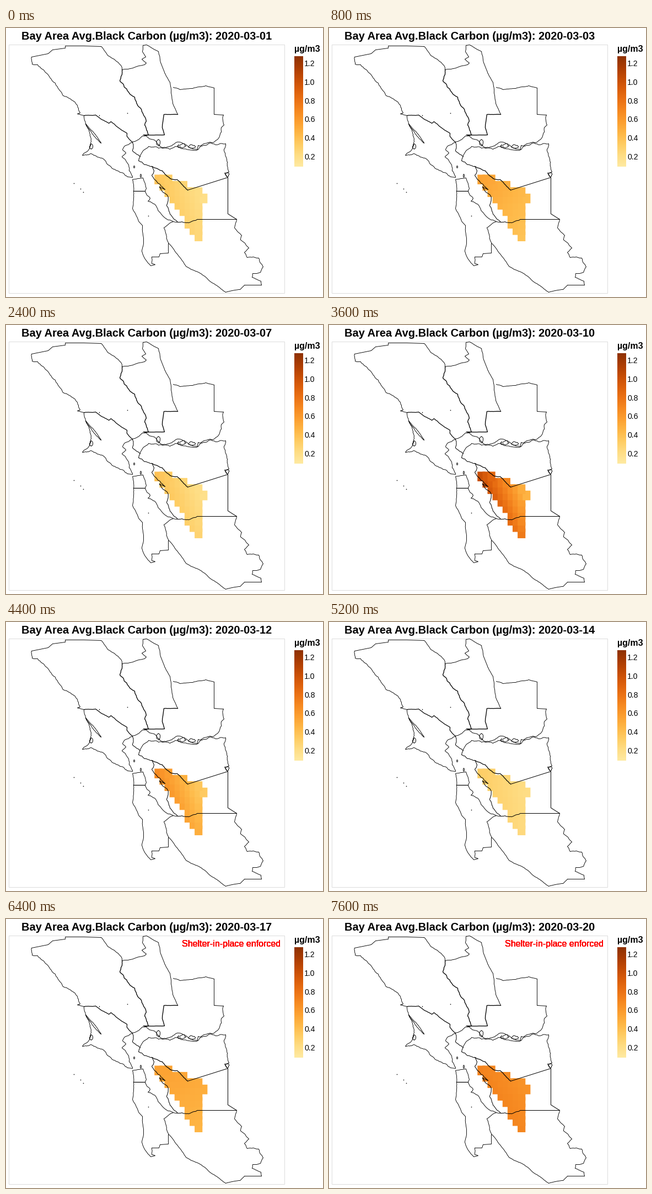
These frames come from a looping animation (575 by 487 pixels, 8 s). A matplotlib script:

```python
import numpy as np
import matplotlib.pyplot as plt
from matplotlib.animation import FuncAnimation
from matplotlib.colors import LinearSegmentedColormap, Normalize
from matplotlib.patches import Rectangle

W, H, DPI = 575, 487, 100
DAYS, STEP_MS = 20, 400
PX = 72 / DPI
plt.rcParams["font.family"] = "Liberation Sans"

fig = plt.figure(figsize=(W / DPI, H / DPI), dpi=DPI, facecolor="white")
ax = fig.add_axes([0, 0, 1, 1])
ax.axis("off")

cmap = LinearSegmentedColormap.from_list("carbon", [
    "#feeaa1", "#fedd84", "#fecc63", "#feb746", "#fca031", "#f68921",
    "#eb7215", "#db5e0b", "#c54c05", "#ab3d03", "#8f3204"])
norm = Normalize(0.094, 1.277)
rng = np.random.default_rng(7)


def label(x, y, text, size, **kw):
    return ax.text(x, y, text, fontsize=size * PX, va="baseline", **kw)


def fractal(a, b, amp):
    """Points from a up to b, with midpoints displaced in proportion to length."""
    d = b - a
    if np.hypot(*d) < 2.5:
        return [a]
    mid = (a + b) / 2 + np.array([-d[1], d[0]]) * rng.uniform(-amp, amp)
    return fractal(a, mid, amp) + fractal(mid, b, amp)


def border(*points, amp=0.11, width=0.9):
    pts = np.array(points, float) + 0.5
    path = [p for a, b in zip(pts, pts[1:]) for p in fractal(a, b, amp)]
    x, y = np.array(path + [pts[-1]]).T
    ax.plot(x, y, color="black", lw=width * PX, snap=False, zorder=3)


def islet(x, y, rx, ry):
    turns = np.linspace(0, 2 * np.pi, 9)
    border(*zip(x + rx * np.cos(turns), y + ry * np.sin(turns)), amp=0.3)


# Plot frame and titles
ax.add_patch(Rectangle((5.5, 30.5), 500, 450, fill=False, ec="#dddddd", lw=PX,
                       snap=False))
title = label(255, 21, "", 20, ha="center", weight="bold")
notice = [label(498.3, 50, "Shelter-in-place enforced", 16, ha="right",
                color="red", zorder=4) for _ in range(6)]

# Legend
label(523, 43, "µg/m3", 16, weight="bold")
ax.imshow(np.linspace(1, 0, 200)[:, None], cmap=cmap, aspect="auto",
          extent=(523, 539, 251, 51), interpolation="nearest")
for value in np.arange(0.2, 1.3, 0.2):
    label(541, 256 - (value - 0.094) * 169, f"{value:.1f}", 14)
ax.set(xlim=(0, W), ylim=(H, 0))

# Overlapping data cells in a slanted band, drawn from south to north
cells = []
for row in reversed(range(10)):
    first = row - (row > 6)
    last = min(2 + 3 * row, 8) + (row == 3)
    for col in range(first, last + 1):
        cell = Rectangle((269.3 + 9.1 * col, 265.5 + 11.45 * row), 14.2, 17.5,
                         lw=0, zorder=2, snap=False)
        cells.append((col, row, ax.add_patch(cell)))

# North coast and its inland border
border((46, 52), (47, 65), (57, 66), (75, 83), (83, 95), (100, 116), (103, 122),
       (124, 133), (131, 145), (134, 153), (129, 155), (141, 158))
border((46, 52), (76, 46), (84, 39), (107, 36), (107, 32), (139, 32), (172, 33),
       amp=0)
border((172, 33), (185, 50), (196, 56), (209, 69), (210, 75), amp=0.07)
border((210, 75), (206, 95), (222, 116), (233, 125), (249, 157), (254, 168),
       (251, 175), (258, 193), width=1.3)
border((141, 158), (162, 157), (186, 172), (190, 169), (202, 179), (219, 190),
       (219, 196), (229, 206), amp=0.05, width=1.2)

# North-east valleys
border((210, 75), (251, 66), (254, 63), (246, 56), (253, 52), (247, 42),
       (248, 31), (254, 30), (276, 42), (280, 62), (297, 98), (299, 117),
       (302, 136), (311, 156), amp=0.04)
border((311, 156), (286, 156), (283, 180), (287, 193), (249, 193), amp=0.03,
       width=1.3)
border((303, 107), (315, 111), (345, 107), (362, 104), (377, 108), amp=0.06)
border((377, 108), (377, 156), (394, 157), amp=0)
border((394, 157), (395, 175), (390, 180), (387, 195), (375, 207), (361, 212),
       (348, 212), (347, 219), (332, 216), (318, 207), (310, 206), (296, 214),
       (283, 216), (271, 204), (249, 193))
border((258, 193), (247, 195), (239, 202), (229, 206), amp=0.06)

# West peninsula with its long inlet
border((141, 158), (144, 173), (152, 195), (154, 205), (148, 222), (138, 230),
       (153, 227), (177, 237), (184, 247), (205, 260), (220, 269), (229, 270),
       (223, 258), (219, 243), (210, 233), (217, 226), (211, 220), (215, 213),
       (229, 206))
border((144, 173), (158, 188), (172, 208), (160, 196), (144, 173), amp=0.05)

# East bay
border((229, 206), (229, 222), (243, 232), (240, 240), (251, 247), (264, 250),
       (268, 258), (264, 266), (276, 281), (288, 292), (278, 287), (293, 304),
       (291, 320), (300, 340), (311, 351), (326, 352), (336, 350), (347, 346),
       width=1)
border((243, 232), (258, 214), (283, 217), (297, 219), (307, 214), (320, 218),
       (347, 220), (355, 211), (370, 206), (380, 211), (398, 209), (395, 219),
       (400, 237), (404, 260), (396, 262), (402, 270))
border((264, 250), (283, 258), (297, 272), (310, 274), (329, 293), amp=0.07,
       width=1.2)
border((329, 293), (402, 270), (402, 336), (418, 346), (347, 346), amp=0, width=1)

# City and west shore
border((231, 295), (229, 274), (248, 271), (254, 290), (252, 295), amp=0.06)
border((231, 295), (252, 295), amp=0, width=1.2)
border((231, 295), (229, 326), (240, 349), (247, 357), (249, 385), (246, 404),
       (252, 418), (262, 430), (270, 428), (264, 426), (264, 414), amp=0.05)
border((264, 414), (277, 414), (279, 408), (294, 407), (294, 390), amp=0)
border((252, 295), (261, 308), (257, 313), (272, 322), (285, 341), (303, 350))
border((311, 351), (303, 350), (286, 361), (289, 370), (295, 390), amp=0.07)

# South county
border((295, 390), (306, 404), (315, 415), (326, 431), (347, 441), (360, 449),
       (372, 460), (385, 468), (398, 478), (424, 473), (432, 465), amp=0.05)
border((432, 465), (463, 465), amp=0)
border((463, 465), (462, 458), (446, 451), (447, 444), (461, 442), (466, 432),
       (458, 416), (437, 415), (432, 406), (440, 398), (425, 383), (427, 375),
       (414, 361), (418, 346), amp=0.08)

# Marsh and bay islands, then offshore specks
for x, y, rx, ry in [(276, 207, 3, 6), (318, 213, 8, 3), (337, 214, 6, 3),
                     (154, 214, 3, 5), (232, 251, 1, 2), (244, 267, 1, 3),
                     (401, 265, 3, 4)]:
    islet(x, y, rx, ry)
for x, y in [(123, 281), (135, 291), (140, 297), (169, 158), (220, 154), (258, 340)]:
    ax.add_patch(plt.Circle((x + .5, y + .5), .8, color="black", lw=0, zorder=3))

# Day: carbon level at the north-west, east and south corners
LEVELS = {0: (.37, .20, .26), 4: (.74, .65, .51), 6: (.39, .19, .28),
          9: (1.02, .47, .76), 13: (.32, .21, .24), 16: (.56, .50, .46),
          18: (.57, .52, .46), 19: (.72, .64, .70)}
CORNERS = np.array([(1, 0, 0), (1, 9, 3), (1, 8, 9)])


def draw(day):
    corner = [np.interp(day, list(LEVELS), level) for level in zip(*LEVELS.values())]
    base, per_col, per_row = np.linalg.solve(CORNERS, corner)
    for col, row, cell in cells:
        cell.set_facecolor(cmap(norm(base + per_col * col + per_row * row)))
    title.set_text(f"Bay Area Avg.Black Carbon (µg/m3): 2020-03-{day + 1:02d}")
    for text in notice:
        text.set_visible(day >= 16)
    return []


anim = FuncAnimation(fig, draw, frames=DAYS, interval=STEP_MS, repeat=True,
                     repeat_delay=0)
plt.show()
```
